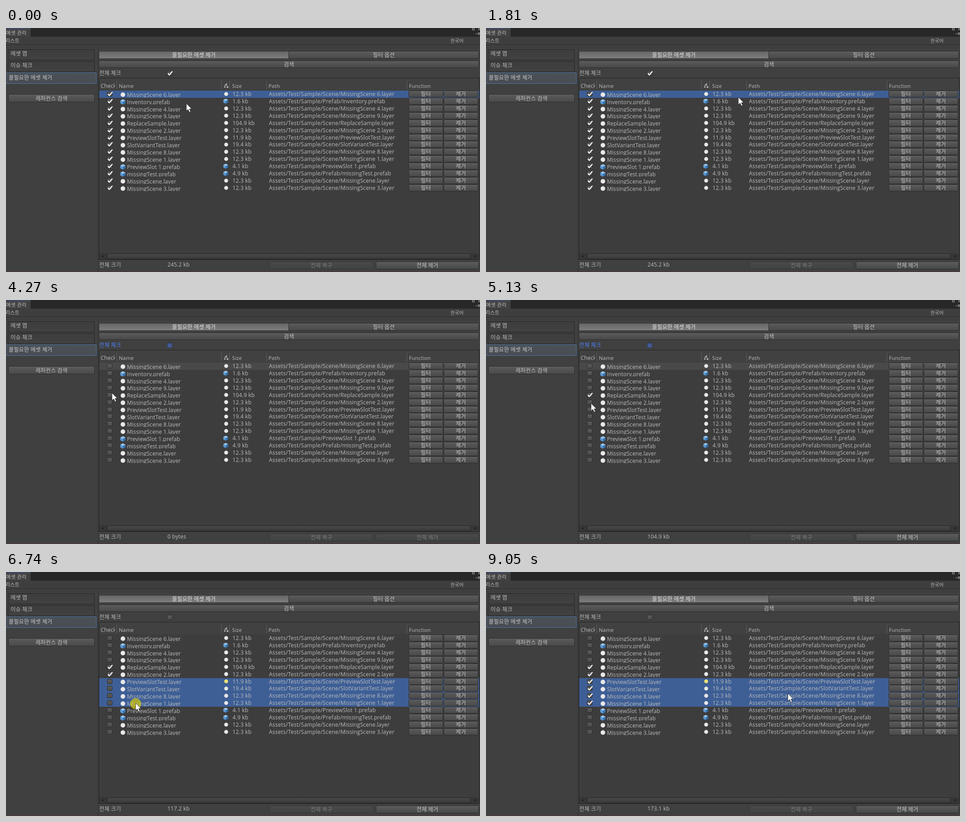
An HTML page with a canvas that plays this animation: 1042x538 px, repeating every 9140 ms.

```html
<!DOCTYPE html>
<html lang="ko">
<head>
<meta charset="utf-8">
<title>에셋 관리</title>
<style>
  html, body { margin: 0; width: 100%; height: 100%; overflow: hidden; background: #404040; }
  canvas { display: block; width: 100%; height: 100%; }
</style>
</head>
<body>
<canvas id="stage" width="1042" height="538"></canvas>
<script>
const ctx = document.getElementById('stage').getContext('2d');
const W = 1042, H = 538, LOOP = 9140;
const FONT = '"Open Sans", "Noto Sans CJK KR", "Noto Sans CJK", sans-serif';
const TEXT = '#bcbcbc', DIM = '#7c7c7c', EDGE = '#2c2c2c', BLUE = '#3e5f96';
const ROW_TOP = 138, ROW_H = 15.92;

// "name:size", scenes of 12.3 kb by default
const rows = `MissingScene 6,Inventory.prefab:1.6,MissingScene 4,MissingScene 9,ReplaceSample:104.9,
MissingScene 2,PreviewSlotTest:11.9,SlotVariantTest:19.4,MissingScene 8,MissingScene 1,
PreviewSlot 1.prefab:4.1,missingTest.prefab:4.9,MissingScene,MissingScene 3`
  .split(/,\s*/).map(entry => {
    const [base, size = '12.3'] = entry.split(':');
    const prefab = base.endsWith('.prefab');
    const folder = !prefab ? 'Scene/' : base.startsWith('Preview') ? '' : 'Prefab/';
    return {
      prefab, size: +size,
      name: prefab ? base : base + '.layer',
      dir: 'Assets/Test/Sample/' + folder
    };
  });

// Mouse presses; those with a range set its check boxes on release
const clicks = [
  { down: 2720, up: 2880, from: 0, to: 13, on: false },
  { down: 4670, up: 4820, from: 4, to: 4, on: true },
  { down: 5380, up: 5440, from: 5, to: 5, on: true },
  { down: 6290, up: 6440 },
  { down: 6740, up: 6830 },
  { down: 7230, up: 7590, from: 6, to: 9, on: true }
];
const [FOCUS, SELECT, EXTEND] = [0, 3, 4].map(i => clicks[i].down);

const clamp = (v, lo = 0, hi = 1) => Math.min(hi, Math.max(lo, v));
const mix = (a, b, k) => a + (b - a) * k;
const ease = u => u * u * (3 - 2 * u);

// Elliptic swing whose [cx, cy, rx, ry] drifts from a to b
function swing(a, b, k, angle) {
  const [cx, cy, rx, ry] = a.map((v, i) => mix(v, b[i], k));
  return [cx + rx * Math.cos(angle), cy + ry * Math.sin(angle)];
}

function circling(t) {
  const u = (clamp(t, 210, 2050) - 210) / 1600;
  return swing([455, 333, 114, 194], [481, 323, 141, 200], u, -2.11 - 11.47 * u);
}

function settling(t) {
  const u = clamp((t - 7930) / 1120);
  return swing([521, 346, 303, 150], [697, 283, 94, 16], u * u, -2.75 - 11.75 * u);
}

// Glides: start, end, x, y, vertical bow
const glides = [
  [2050, 2300, 632, 270, 140], [2300, 2510, 357, 94, -60], [3150, 3360, 250, 276, 0],
  [3520, 3860, 585, 388, 0], [3860, 4270, 233, 205, 0], [4820, 5130, 231, 228, 0],
  [5780, 6140, 261, 245, 0], [6500, 6650, 285, 289, 0], [6830, 6990, 223, 289, 0]
];

function pointerAt(t) {
  if (t > 7930) return settling(t);
  let [x, y] = circling(t);
  for (const [start, end, gx, gy, bow] of glides) {
    if (t <= start) break;
    const u = clamp((t - start) / (end - start));
    x = mix(x, gx, ease(u));
    y = mix(y, gy, ease(u)) + bow * Math.sin(Math.PI * u);
  }
  return [x, y];
}

function stateAt(t) {
  const checked = rows.map((_, i) => clicks.reduce(
    (on, c) => t >= c.up && i >= c.from && i <= c.to ? c.on : on, true));
  const sum = rows.reduce((s, row, i) => s + (checked[i] ? row.size : 0), 0);
  const selected = i => t < FOCUS ? i === 0 : t >= SELECT && i >= 6 && i <= (t < EXTEND ? 6 : 9);
  return {
    checked, sum, selected,
    allChecked: t < clicks[0].up,
    focused: t >= FOCUS && t < SELECT,
    pressed: clicks.some(c => t >= c.down && t < c.up)
  };
}

function rect(x, y, w, h, fill) {
  ctx.fillStyle = fill;
  ctx.fillRect(x, y, w, h);
}

function text(str, x, y, { color = TEXT, size = 12, align = 'left', gap = 0.12 } = {}) {
  ctx.font = `${size}px ${FONT}`;
  ctx.letterSpacing = gap + 'px';
  ctx.textAlign = align;
  ctx.fillStyle = color;
  ctx.fillText(str, x, y);
}

function clipped(x, y, w, h, draw) {
  ctx.save();
  ctx.beginPath();
  ctx.rect(x, y, w, h);
  ctx.clip();
  draw();
  ctx.restore();
}

function poly(points, fill) {
  ctx.beginPath();
  points.forEach(([x, y]) => ctx.lineTo(x, y));
  ctx.closePath();
  ctx.fillStyle = fill;
  ctx.fill();
}

function disc(x, y, r, fill) {
  ctx.beginPath();
  ctx.arc(x, y, r, 0, 7);
  ctx.fillStyle = fill;
  ctx.fill();
}

function panel(x, y, w, h, top, bottom, edge = EDGE, r = 2) {
  const g = ctx.createLinearGradient(0, y, 0, y + h);
  g.addColorStop(0, top);
  g.addColorStop(1, bottom);
  ctx.beginPath();
  ctx.roundRect(x + 0.5, y + 0.5, w - 1, h - 1, r);
  ctx.fillStyle = g;
  ctx.fill();
  ctx.strokeStyle = edge;
  ctx.lineWidth = 1;
  ctx.stroke();
}

function button(label, x, y, w, h, { on = true, lit = false } = {}) {
  if (lit) panel(x, y, w, h, '#666', '#7e7e7e', '#3a3a3a');
  else if (on) panel(x, y, w, h, '#5c5c5c', '#484848');
  else panel(x, y, w, h, '#4a4a4a', '#424242', '#383838');
  if (on && !lit) rect(x + 2, y + 1, w - 4, 1, '#666');
  text(label, x + w / 2, y + h / 2 + 4.5, { align: 'center', color: on ? (lit ? '#e2e2e2' : '#c4c4c4') : DIM });
}

function checkbox(x, y, on, focused) {
  const [top, bottom, edge] = focused ? ['#3d5288', '#4a5f98', '#2a3658'] : ['#5c5c5c', '#4c4c4c', '#292929'];
  panel(x - 6, y - 5.5, 12, 11, top, bottom, edge);
  if (!on) return;
  ctx.beginPath();
  ctx.moveTo(x - 4, y);
  ctx.lineTo(x - 1, y + 3.5);
  ctx.lineTo(x + 6, y - 4.5);
  ctx.strokeStyle = '#f4f4f4';
  ctx.lineWidth = 2.4;
  ctx.stroke();
}

function cube(x, y, r) {
  const w = r * 0.95, h = r * 0.5;
  poly([[x, y - r], [x + w, y - h], [x, y], [x - w, y - h]], '#9cc8ee');
  poly([[x - w, y - h], [x, y], [x, y + r], [x - w, y + h]], '#5b9bd8');
  poly([[x + w, y - h], [x, y], [x, y + r], [x + w, y + h]], '#3873b0');
}

function drawFrame() {
  rect(0, 0, W, H, '#404040');
  rect(0, 0, W, 19, '#282828');
  rect(0, 1, 54, 18, '#414141');
  rect(0, 1, 54, 1, '#47709f');
  text('에셋 관리', 0, 15, { size: 11.3 });
  rect(0, 19, W, 18, '#3e3e3e');
  rect(0, 37, W, 1, '#2b2b2b');
  rect(0, 43, W, 1, '#393939');
  text('리스트', -1, 32, { size: 11 });
  text('한국어', 977, 32, { size: 10.3 });
  ctx.strokeStyle = '#aaa';
  ctx.lineWidth = 1;
  ctx.strokeRect(1025.5, 0.5, 4, 4);
  ctx.beginPath();
  ctx.moveTo(1038, 0); ctx.lineTo(1042, 5);
  ctx.moveTo(1042, 0); ctx.lineTo(1038, 5);
  ctx.stroke();
  poly([[1032, 12], [1036, 12], [1034, 14]], '#a8a8a8');
  for (let k = 0; k < 3; k++) rect(1037, 10 + k * 2, 5, 1, '#a8a8a8');

  panel(4, 47, 191, 24, '#3d3d3d', '#414141', '#272727', 0);
  panel(4, 73, 191, 24, '#3d3d3d', '#414141', '#272727', 0);
  panel(-1, 98, 200, 25, '#4b5157', '#484d53', '#4b74a4', 0);
  text('에셋 맵', 10, 61);
  text('이슈 체크', 10, 87);
  text('불필요한 에셋 제거', 6, 114, { color: '#c8c8c8' });
  button('레퍼런스 검색', 5, 146, 190, 18);
  rect(202, 44, 1, 494, '#303030');
}

function drawTop(s) {
  button('불필요한 에셋 제거', 204, 51, 418, 17, { lit: true });
  button('필터 옵션', 621, 51, 419, 17);
  button('검색', 204, 72, 836, 16);
  text('전체 체크', 205, 104, { color: s.focused ? '#4b80f4' : TEXT });
  checkbox(360, 100, s.allChecked, s.focused);
}

function drawHeader() {
  panel(204, 110, 837, 401, '#3d3d3d', '#3d3d3d', '#242424', 0);
  rect(205, 111, 835, 26, '#414141');
  [243, 473, 491, 572, 881].forEach(x => rect(x, 116, 1, 19, '#606060'));
  clipped(205, 112, 34, 26, () => text('Check', 208, 132));
  [['Name', 248], ['Size', 497], ['Path', 577], ['Function', 886]]
    .forEach(([label, x]) => text(label, x, 132, { size: 11.6 }));
  poly([[479, 127], [486, 121], [486, 127]], '#a0a0a0');
  disc(481, 130, 2, '#a0a0a0');
  rect(485, 128, 4, 4, '#a0a0a0');
}

function drawRow(row, i, s) {
  const y = ROW_TOP + i * ROW_H, top = Math.round(y), selected = s.selected(i);
  if (selected) rect(205, top, 835, 16, BLUE);
  else if (i === 0 && s.focused) rect(205, top, 835, 16, '#494949');
  checkbox(228, top + 7.5, s.checked[i], false);
  if (row.prefab) {
    cube(257, y + 9, 6);
    cube(483, y + 7.5, 5.6);
  } else {
    disc(257, y + 9, 5, '#e8e8e8');
    disc(484, y + 7.5, 4.3, i && i === 6 && selected ? '#ece07a' : '#e8e8e8');
  }
  clipped(266, y, 205, 14.7, () => text(row.name, 266, y + 13.7));
  text(row.size + ' kb', 498, y + 12, { gap: 0.18 });
  text(row.dir, 578, y + 12, { gap: 0.27 });
  text(row.name, 578 + ctx.measureText(row.dir).width, y + 12);
  button('필터', 885, top, 76, 15);
  button('제거', 962, top, 76, 15);
}

function drawBottom(s) {
  rect(205, 497, 835, 13, '#363636');
  panel(221, 497, 802, 13, '#4a4a4a', '#383838', '#242424', 6);
  poly([[210, 503.5], [214, 501], [214, 506]], '#191919');
  poly([[1034, 503.5], [1030, 501], [1030, 506]], '#191919');
  text('전체 크기', 205, 526.5);
  text(s.sum ? s.sum.toFixed(1) + ' kb' : '0 bytes', 355, 526, { gap: 0.18 });
  button('전체 복구', 580, 515, 227, 17, { on: false });
  button('전체 제거', 813, 515, 227, 17, { on: s.sum > 0 });
  rect(0, 537, W, 1, '#4c3436');
}

function drawPointer(x, y, pressed) {
  if (pressed) disc(x, y + 1.5, 12, 'rgba(213,201,10,.7)');
  const shape = [[0, 0], [0, 16.5], [3.8, 13], [6.6, 19.2], [9.4, 18], [6.7, 12], [11.8, 12]]
    .map(([dx, dy]) => [x + dx, y + dy]);
  poly(shape, '#fff');
  ctx.strokeStyle = '#1c1c1c';
  ctx.lineWidth = 0.8;
  ctx.stroke();
}

function render(t) {
  const s = stateAt(t);
  drawFrame();
  drawTop(s);
  drawHeader();
  rows.forEach((row, i) => drawRow(row, i, s));
  drawBottom(s);
  drawPointer(...pointerAt(t), s.pressed);
}

const start = performance.now();
function tick() {
  render((performance.now() - start) % LOOP);
  requestAnimationFrame(tick);
}
tick();
</script>
</body>
</html>
```
